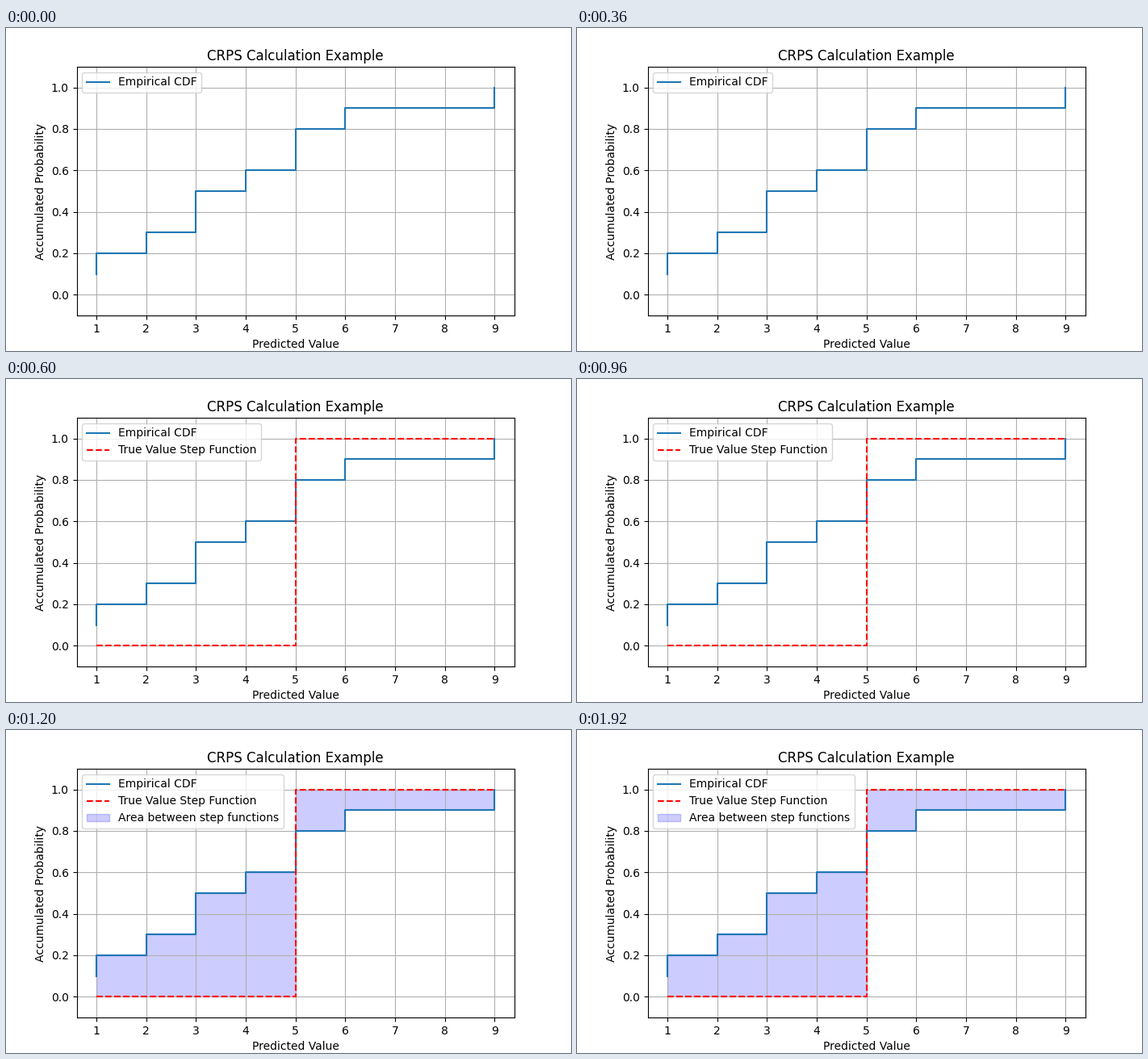
A matplotlib script that plays this animation: 700 by 400 pixels, repeating every 2.4 s.

```python
import numpy as np
import matplotlib.pyplot as plt
from matplotlib.animation import FuncAnimation

STEP_MS = 600
FRAMES = 4
TRUE_VALUE = 5

samples = np.array([1, 1, 2, 3, 3, 4, 5, 5, 6, 9])
empirical = np.arange(1, len(samples) + 1) / len(samples)
truth = (samples >= TRUE_VALUE).astype(float)

plt.rcParams["font.family"] = "DejaVu Sans"
fig, ax = plt.subplots(figsize=(7, 4), dpi=100)
ax.set_title("CRPS Calculation Example")
ax.set_xlabel("Predicted Value")
ax.set_ylabel("Accumulated Probability")
ax.grid(True)

cdf_line, = ax.step(samples, empirical, where="post", label="Empirical CDF")
truth_line, = ax.step(samples, truth, where="post", color="red",
                      linestyle="--", label="True Value Step Function")
area = ax.fill_between(samples, empirical, truth, step="post", color="blue",
                       alpha=0.2, label="Area between step functions")
ax.set_xlim(0.6, 9.4)
ax.set_ylim(-0.1, 1.1)

layers = [cdf_line, truth_line, area]


def update(frame):
    """Reveal one more layer per step, then hold the finished chart."""
    shown = min(frame + 1, len(layers))
    for i, layer in enumerate(layers):
        layer.set_visible(i < shown)
    ax.legend(handles=layers[:shown], loc="upper left")
    return layers


anim = FuncAnimation(fig, update, frames=FRAMES, interval=STEP_MS,
                     init_func=lambda: update(0), repeat=True, blit=False)
plt.show()
```
